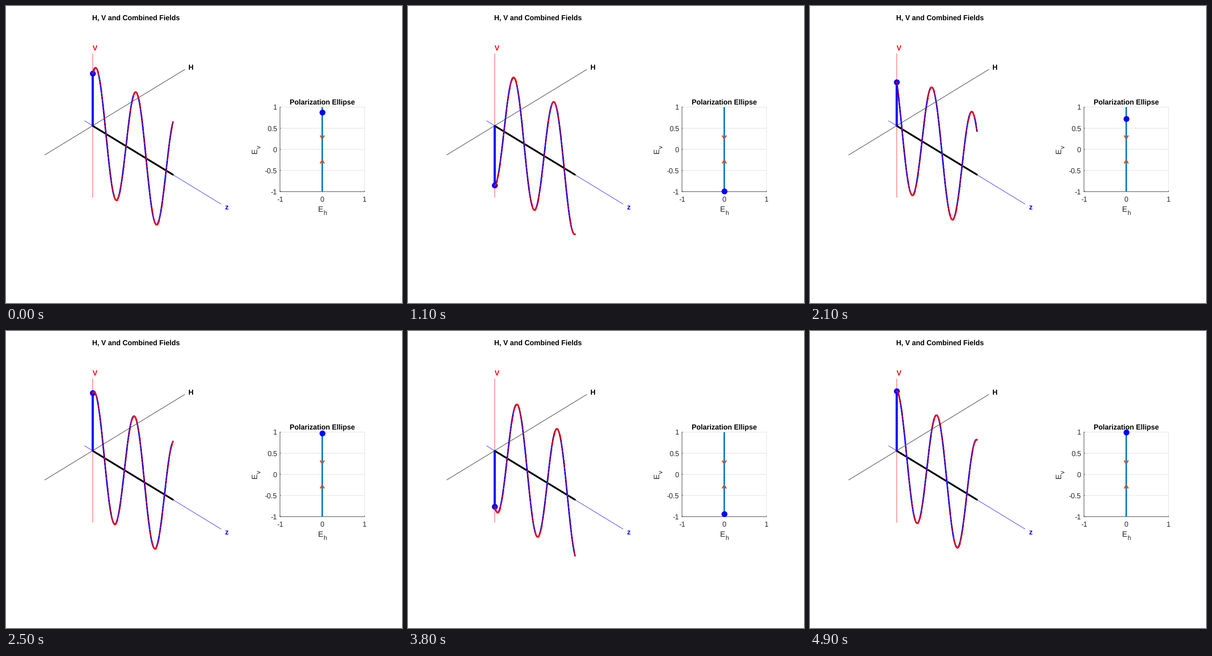
Write a matplotlib script that moves like this. It is 864x648 px and loops after 5000 ms.

```python
import numpy as np
import matplotlib.pyplot as plt
from matplotlib.animation import FuncAnimation

W, H, DPI = 864, 648, 100
PX = 72 / DPI                    # points per pixel
N_FRAMES, INTERVAL = 50, 100

plt.rcParams["font.family"] = "Liberation Sans"
plt.rcParams["text.hinting"] = "none"

fig = plt.figure(figsize=(W / 100, H / 100), dpi=DPI, facecolor="white")
ax = fig.add_axes([0, 0, 1, 1])
ax.set_xlim(0, W)
ax.set_ylim(H, 0)
ax.axis("off")

DARK = "#262626"
GRID = "#dfdfdf"
BLUE = "#0000ff"
RED = "#ff0000"


def line(xs, ys, color, width, z=1, **kw):
    return ax.plot(xs, ys, color=color, lw=width * PX, zorder=z,
                   snap=False, **kw)[0]


def label(x, y, text, size=15.5, color=DARK, **kw):
    ax.text(x, y, text, fontsize=size * PX, color=color, zorder=5,
            va="baseline", **kw)


def dots(size, color, z):
    return ax.plot([], [], "o", color=color, ms=size * PX, mew=0, zorder=z,
                   snap=False)[0]


# 3D view: axes, labels and the H component lying along z
X0, Y0 = 189.2, 261.5
X1, Y1 = 364.2, 368.0
AMP = 131.0

line([X0, X0], [104, 417.5], RED, 0.8)
line([84.5, 390], [325, 138.5], "black", 0.8)
line([171.5, 469], [250.5, 432], BLUE, 0.8)
line([X0, X1], [Y0, Y1], "black", 3.8, 3, solid_capstyle="round")

label(188.4, 32, "H, V and Combined Fields", color="black", weight="bold")
label(188.7, 97, "V", color=RED, weight="bold")
label(398.4, 138.8, "H", color="black", weight="bold")
label(476.9, 443.6, "z", color=BLUE, weight="bold")

# Polarization plot
CX, CY, HALF = 690.0, 312.8, 92.2
LEFT, RIGHT = CX - HALF, CX + HALF
TOP, BOTTOM = CY - HALF, CY + HALF

for v in (1, 0.5, 0, -0.5, -1):
    y = CY - v * HALF
    line([LEFT, RIGHT], [y, y], GRID, 1)
    line([LEFT, LEFT + 2], [y, y], DARK, 0.9, 2, solid_capstyle="butt")
    label(591.5, y + 5.8, f"{v:g}", ha="right")
for v in (-1, 0, 1):
    x = CX + v * HALF
    line([x, x], [TOP, BOTTOM], GRID, 1)
    line([x, x], [BOTTOM - 2, BOTTOM], DARK, 0.9, 2, solid_capstyle="butt")
    label(x, 426.8, f"{v:g}", ha="center")
line([LEFT, LEFT, RIGHT], [TOP, BOTTOM, BOTTOM], DARK, 0.9, 2)

line([CX, CX], [TOP, BOTTOM], "#0072bd", 3.2, 3, solid_capstyle="butt")
for tip, back in ((290, 282.5), (336, 343.5)):
    line([CX - 4.5, CX, CX + 4.5], [back, tip, back], "#d95319", 2.6, 4,
         solid_capstyle="butt")

label(CX, 214.4, "Polarization Ellipse", color="black",
      ha="center", weight="bold")
label(680.4, 448.8, "E", 17)
label(691.6, 456, "h", 13.6)
turn = dict(rotation=90, rotation_mode="anchor")
label(548, 322, "E", 17, **turn)
label(556, 310.6, "v", 13.6, **turn)

# Moving parts
s = np.linspace(0, 1, 201)
base_x = X0 + (X1 - X0) * s
base_y = Y0 + (Y1 - Y0) * s

stem = line([], [], BLUE, 4.8, 4, solid_capstyle="butt")
tip_dot = dots(12.8, BLUE, 4.5)
wave = line([], [], BLUE, 3.2, 6)
beads = dots(3.2, RED, 7)
plot_dot = dots(12.8, BLUE, 8)


def update(i):
    # 25 steps per cycle, with one held step early in the loop
    step = i if i < 3 else i - 1
    phase = 2 * np.pi * (step + 2) / 25
    field = np.cos(4 * np.pi * s - phase)
    y = base_y - AMP * field
    wave.set_data(base_x, y)
    beads.set_data(base_x, y)
    stem.set_data([X0, X0], [Y0, y[0]])
    tip_dot.set_data([X0], [y[0]])
    plot_dot.set_data([CX], [CY - HALF * field[0]])
    return stem, tip_dot, wave, beads, plot_dot


anim = FuncAnimation(fig, update, frames=N_FRAMES, interval=INTERVAL,
                     repeat=True, repeat_delay=0, blit=False)
plt.show()
```
